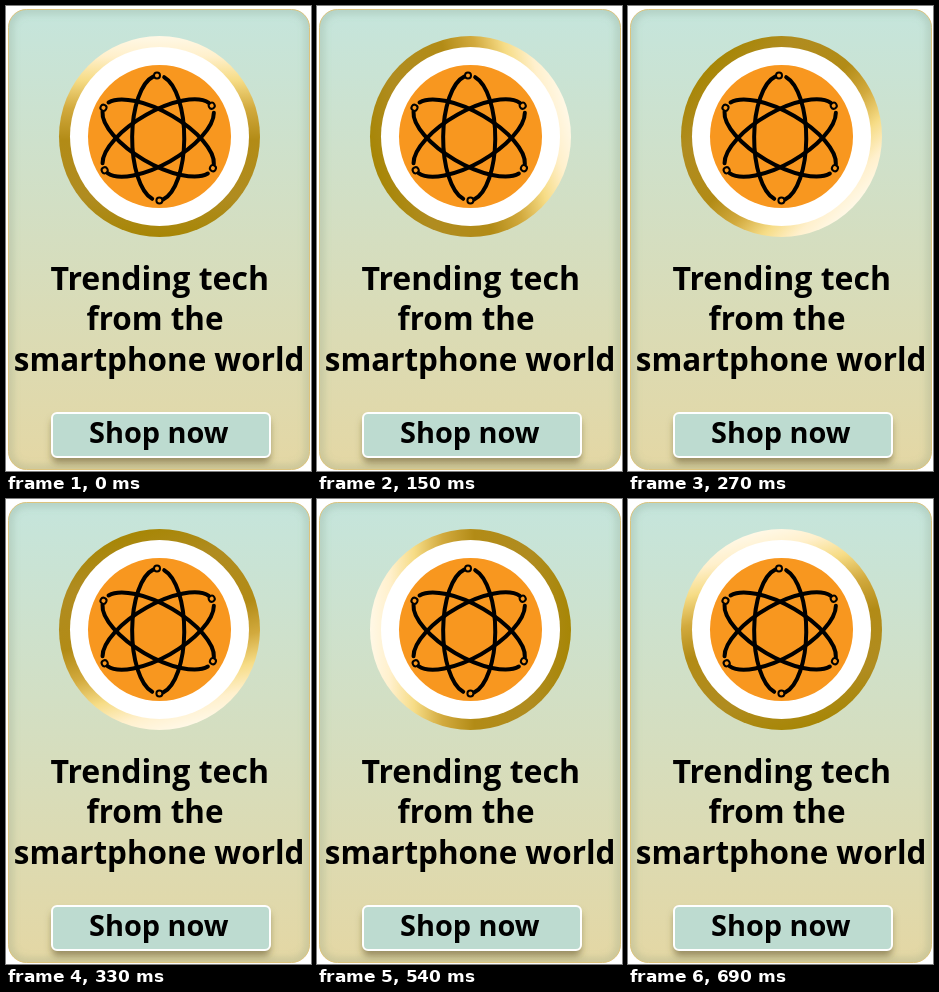
Write an HTML page that moves like this. It is 305 by 465 pixels and loops after 720 ms.

```html
<!DOCTYPE html>
<html lang="en">
<head>
<meta charset="utf-8">
<title>Trending tech</title>
<style>
html, body { margin: 0; width: 100%; height: 100%; overflow: hidden; background: #fff; }
svg { display: block; width: 305px; height: 465px; }
text { font: 700 31.4px "Open Sans", "Noto Sans", sans-serif; fill: #000; }
.lead { font-size: 32px; }
.button { font-size: 28.9px; }
</style>
</head>
<body>
<svg viewBox="0 0 305 465">
  <defs>
    <linearGradient id="card" x1="0" y1="0" x2="0" y2="1">
      <stop offset="0" stop-color="#c5e5dc"/>
      <stop offset="1" stop-color="#e4d7a4"/>
    </linearGradient>
    <linearGradient id="gold" gradientUnits="userSpaceOnUse" x1="153.5" y1="30" x2="153.5" y2="231">
      <stop offset="0" stop-color="#fff8e6"/>
      <stop offset=".1" stop-color="#fff0cc"/>
      <stop offset=".22" stop-color="#f6dc86"/>
      <stop offset=".36" stop-color="#d2aa3e"/>
      <stop offset=".52" stop-color="#b28b16"/>
      <stop offset=".8" stop-color="#b08c20"/>
      <stop offset="1" stop-color="#a78606"/>
    </linearGradient>
    <filter id="shadow" x="-10%" y="-20%" width="120%" height="170%">
      <feDropShadow dx="0" dy="6" stdDeviation="3.5" flood-color="#5a4f28" flood-opacity=".55"/>
    </filter>
    <filter id="soft"><feGaussianBlur stdDeviation="4"/></filter>
    <clipPath id="inside"><use href="#frame"/></clipPath>
    <rect id="frame" x="2.5" y="3.5" width="301" height="460" rx="18"/>
    <g id="half">
      <path d="M-5 -61.4A26 62.5 0 0 0 -6 60.8" fill="none" stroke="#000" stroke-width="4" stroke-linecap="round"/>
      <circle cx="-1.2" cy="-62.5" r="3" fill="#f8971f" stroke="#000" stroke-width="2"/>
    </g>
    <g id="orbit">
      <use href="#half"/>
      <use href="#half" transform="rotate(180)"/>
    </g>
  </defs>

  <use href="#frame" fill="url(#card)"/>
  <g clip-path="url(#inside)">
    <use href="#frame" fill="none" stroke="#6f8a70" stroke-opacity=".35" stroke-width="6" filter="url(#soft)"/>
  </g>

  <circle cx="153.5" cy="130.5" r="100.5" fill="url(#gold)"/>
  <circle cx="153.5" cy="130.5" r="89.5" fill="#fff"/>
  <circle cx="153.5" cy="130.5" r="71.5" fill="#f8971f"/>
  <g transform="translate(152.2 132)">
    <use href="#orbit"/>
    <use href="#orbit" transform="rotate(-60)"/>
    <use href="#orbit" transform="rotate(60)"/>
  </g>

  <text class="lead" x="44.5" y="284">Trending tech</text>
  <text x="80.5" y="324">from the</text>
  <text x="7.8" y="365">smartphone world</text>

  <rect x="46" y="407" width="218" height="44" rx="5" fill="#bddbd0" filter="url(#shadow)"/>
  <use href="#frame" fill="none" stroke="#dcc37c"/>
  <rect x="46" y="407" width="218" height="44" rx="5" fill="#bddbd0" stroke="#fff" stroke-width="2"/>
  <text class="button" x="83" y="437">Shop now</text>
</svg>
<script>
const LOOP = 720, STEP = 30;
const gold = document.getElementById("gold");

function draw(ms) {
  const step = Math.floor((ms % LOOP) / STEP);
  const angle = step * 360 * STEP / LOOP;
  gold.setAttribute("gradientTransform", `rotate(${angle} 153.5 130.5)`);
}

let start;
function tick(now) {
  start ??= now;
  draw(Math.max(0, now - start));
  requestAnimationFrame(tick);
}
draw(0);
requestAnimationFrame(tick);
</script>
</body>
</html>
```
